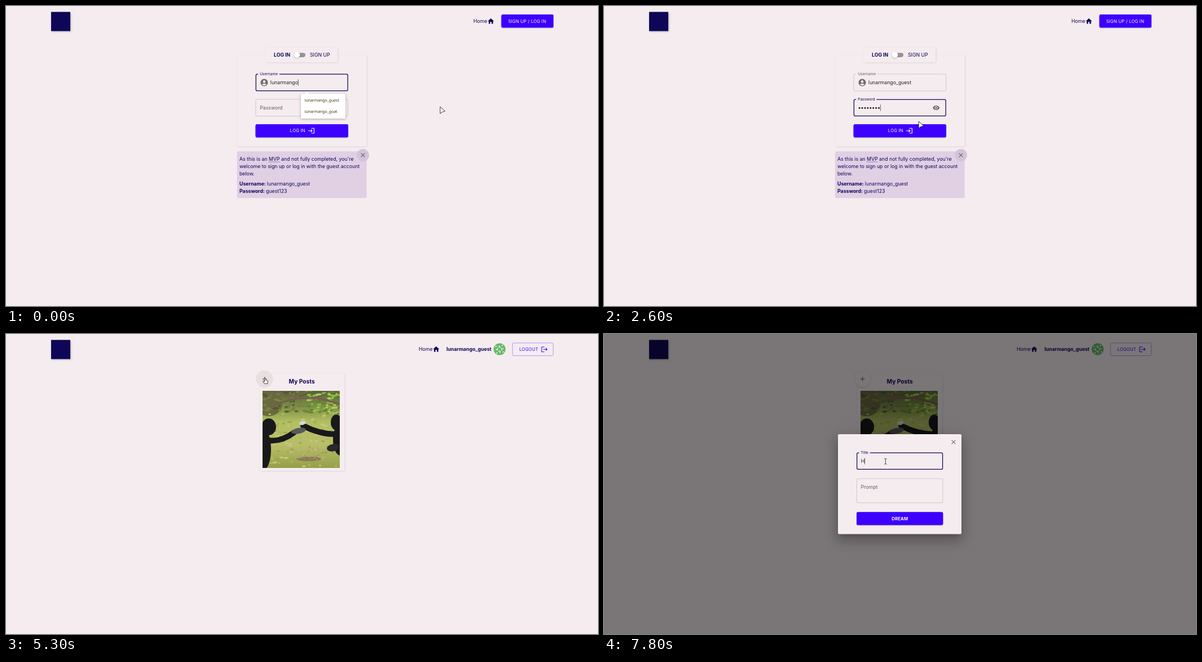
Recreate the animation shown at these times as an HTML page with a canvas. Size 1050 by 533 pixels, loop 8000 ms.

```html
<!DOCTYPE html>
<html lang="en">
<head>
<meta charset="utf-8">
<title>Log in and create</title>
<style>
  html, body { margin: 0; width: 100%; height: 100%; overflow: hidden; background: #f5ecef; }
  canvas { display: block; width: 1050px; height: 533px; }
</style>
</head>
<body>
<canvas id="stage" width="1050" height="533"></canvas>
<script>
const ctx = document.getElementById('stage').getContext('2d');
const LOOP = 8000, W = 1050, H = 533;
const PAGE = '#f5ecef', NAVY = '#0e0757', BLUE = '#3d00ff', GREY = 'rgba(0,0,0,.6)', INK = 'rgba(0,0,0,.87)';
const USER = 'lunarmango_guest', OTHER = 'lunarmango_goat', SECRET = 'guest123';
const BODY = 8.75, SMALL = 6.56, BUTTON = 7.66;
const ICONS = {
  account: 'M12 2C6.48 2 2 6.48 2 12s4.48 10 10 10 10-4.48 10-10S17.52 2 12 2zm0 4c1.93 0 3.5 1.57 3.5 3.5S13.93 13 12 13s-3.5-1.57-3.5-3.5S10.07 6 12 6zm0 14c-2.03 0-4.43-.82-6.14-2.88C7.55 15.8 9.68 15 12 15s4.45.8 6.14 2.12C16.43 19.18 14.03 20 12 20z',
  eye: 'M12 4.5C7 4.5 2.73 7.61 1 12c1.73 4.39 6 7.5 11 7.5s9.27-3.11 11-7.5c-1.73-4.39-6-7.5-11-7.5zM12 17c-2.76 0-5-2.24-5-5s2.24-5 5-5 5 2.24 5 5-2.24 5-5 5zm0-8c-1.66 0-3 1.34-3 3s1.34 3 3 3 3-1.34 3-3-1.34-3-3-3z',
  home: 'M10 20v-6h4v6h5v-8h3L12 3 2 12h3v8z',
  login: 'M11 7 9.6 8.4l2.6 2.6H2v2h10.2l-2.6 2.6L11 17l5-5-5-5zm9 12h-8v2h8c1.1 0 2-.9 2-2V5c0-1.1-.9-2-2-2h-8v2h8v14z',
  logout: 'm17 7-1.41 1.41L18.17 11H8v2h10.17l-2.58 2.58L17 17l5-5zM4 5h8V3H4c-1.1 0-2 .9-2 2v14c0 1.1.9 2 2 2h8v-2H4V5z',
  close: 'M19 6.41 17.59 5 12 10.59 6.41 5 5 6.41 10.59 12 5 17.59 6.41 19 12 13.41 17.59 19 19 17.59 13.41 12z',
  add: 'M19 13h-6v6h-2v-6H5v-2h6V5h2v6h6v2z'
};
const CURSORS = {
  arrow: new Path2D('M.2 .3V12.2L3.4 9.6 8.5 8Z'),
  hand: new Path2D('M-1 .8Q0-.4 1 .8V4.2L4.6 5Q5.4 5.3 5.2 6.5L4.4 10.8H-.8L-3.4 7.2Q-3.6 6-2.2 6.2L-1 7.2Z'),
  beam: new Path2D('M-2-5Q0-5 0-4Q0-5 2-5M0-4V4M-2 5Q0 5 0 4Q0 5 2 5')
};

// Last entry whose start time has passed.
const step = (t, list) => list.filter(e => e[0] <= t).pop();
const between = (t, a, b) => t >= a && t < b;

function text(s, x, y, { size = BODY, weight = 400, color = NAVY, align = 'left', space = 0, family = 'Inter' } = {}) {
  ctx.font = `${weight} ${size}px ${family}, sans-serif`;
  ctx.letterSpacing = space + 'px';
  ctx.textAlign = align;
  ctx.fillStyle = color;
  ctx.fillText(s, x, y);
  const w = ctx.measureText(s).width;
  ctx.letterSpacing = '0px';
  return w;
}

function box(x, y, w, h, r, fill) {
  ctx.beginPath();
  ctx.roundRect(x, y, w, h, r);
  if (fill) { ctx.fillStyle = fill; ctx.fill(); }
}

function blob(x, y, rx, ry, fill, turn = 0) {
  ctx.beginPath();
  ctx.ellipse(x, y, rx, ry, turn, 0, 7);
  ctx.fillStyle = fill;
  ctx.fill();
}

const disc = (x, y, r, fill) => blob(x, y, r, r, fill);

function shadow(alpha, blur, dy, draw, dx = 0) {
  ctx.save();
  ctx.shadowColor = `rgba(0,0,0,${alpha})`;
  ctx.shadowBlur = blur;
  ctx.shadowOffsetX = dx;
  ctx.shadowOffsetY = dy;
  draw();
  ctx.restore();
}

function icon(name, x, y, color, scale = .547) {
  ctx.save();
  ctx.translate(x, y);
  ctx.scale(scale, scale);
  ctx.translate(-12, -12);
  ctx.fillStyle = color;
  ctx.fill(new Path2D(ICONS[name]));
  ctx.restore();
}

function line(points, width, color) {
  ctx.beginPath();
  points.forEach(([x, y]) => ctx.lineTo(x, y));
  ctx.lineWidth = width;
  ctx.strokeStyle = color;
  ctx.stroke();
}

const caret = (x, y) => line([[x, y - 5.6], [x, y + 5.6]], .7, '#222');
const card = (x, y, w, h) => shadow(.11, 3, .8, () => box(x, y, w, h, 2.2, PAGE), .8);

function button(x, y, w, h, fill = BLUE, raised = false) {
  const paint = () => box(x, y, w, h, 2.2, fill);
  shadow(raised ? .3 : .2, raised ? 4 : 1.2, raised ? 2 : 1, paint);
  shadow(.13, raised ? 5.5 : 2.7, .6, paint);
}

// Outlined input whose label moves from inside (lift 0) to the border (lift 1).
function field(x, y, w, h, label, { lift = 1, focus = false, hover = false, labelColor } = {}) {
  const thick = focus ? 1.25 : .6;
  box(x + thick / 2, y + thick / 2, w - thick, h - thick, 2.2);
  ctx.lineWidth = thick;
  ctx.strokeStyle = focus ? NAVY : hover ? INK : 'rgba(0,0,0,.27)';
  ctx.stroke();
  ctx.font = `400 ${SMALL}px Inter, sans-serif`;
  if (lift > .4) {
    ctx.fillStyle = PAGE;
    ctx.fillRect(x + 4.4, y - 1, ctx.measureText(label).width + 6, 3);
  }
  text(label, x + 7.5, y + 18.3 - 16.1 * lift, {
    size: BODY + (SMALL - BODY) * lift,
    color: labelColor || (focus ? NAVY : GREY)
  });
}

function header(loggedIn) {
  shadow(.3, 3, 1, () => { ctx.fillStyle = NAVY; ctx.fillRect(80, 10.5, 34, 34); }, 1);
  const x = loggedIn ? 732 : 829;
  text('Home', x, 30.2);
  icon('home', x + 31, 27, NAVY);
  if (!loggedIn) {
    button(878.7, 15.3, 92.3, 23);
    text('SIGN UP / LOG IN', 890.7, 29.8, { size: BUTTON, color: '#fff', space: .22 });
    return;
  }
  text(USER, 861, 30.2, { weight: 700, align: 'right' });
  avatar(875.5, 27);
  box(898.4, 15.9, 72.2, 22.6, 2.2);
  ctx.lineWidth = .7;
  ctx.strokeStyle = 'rgba(61,0,255,.5)';
  ctx.stroke();
  text('LOGOUT', 910.5, 30, { size: BUTTON, color: BLUE, space: .22 });
  icon('logout', 955, 27.3, BLUE);
}

function avatar(x, y) {
  disc(x, y, 10.6, '#63b866');
  ctx.save();
  ctx.translate(x, y);
  ctx.fillStyle = '#edf3e8';
  for (let i = 0; i < 4; i++) {
    ctx.rotate(Math.PI / 2);
    ctx.fillRect(-1.5, -7, 1.6, 4);
    ctx.fillRect(-1.5, -4.2, 4, 1.4);
    ctx.fillRect(4, -8, 1.6, 3);
  }
  ctx.restore();
}

function infoBox() {
  box(409.7, 258.3, 230, 83, 2.6, '#e1cfe4');
  disc(633, 265, 11, '#d4c4d9');
  icon('close', 633, 265, '#655d69');
  const lead = text('As this is an ', 414, 274.7);
  const w = text('MVP', 414 + lead, 274.7);
  text(" and not fully completed, you're", 414 + lead + w, 274.7);
  ctx.setLineDash([.8, .8]);
  line([[414 + lead, 277], [414 + lead + w, 277]], .7, NAVY);
  ctx.setLineDash([]);
  text('welcome to sign up or log in with the guest account', 414, 287.8);
  text('below.', 414, 300.9);
  [['Username: ', USER, 318.5], ['Password: ', SECRET, 331.6]].forEach(([name, value, y]) => {
    const n = text(name, 414, y, { weight: 700 });
    text(value, 414 + n, y);
  });
}

function suggestions(t) {
  const names = t < 600 ? [USER, OTHER] : [USER];
  const h = 4.4 + names.length * 19.9;
  shadow(.3, 4, 1, () => box(523, 155.8, 79, h, 2, '#fff'));
  ctx.beginPath();
  ctx.moveTo(530, 156);
  ctx.lineTo(534, 152);
  ctx.lineTo(538, 156);
  ctx.fillStyle = '#fff';
  ctx.fill();
  names.forEach((s, i) => text(s, 529.7, 170.2 + i * 19.9,
    { size: 6.9, weight: 500, color: '#463819', family: '"Noto Sans"' }));
}

function loginPage(t) {
  header(false);
  card(409.7, 87, 230, 162.5);
  card(461, 74, 127.3, 26);
  text('LOG IN', 475, 90.2, { weight: 700 });
  text('SIGN UP', 539, 90.2);
  box(512.4, 83.2, 18.6, 7.7, 3.8, '#979193');
  shadow(.3, 2, .8, () => disc(516, 87, 5.4, '#fff'));

  const userFocus = t < 900, passFocus = between(t, 900, 3000);
  field(442.7, 120.6, 164.1, 30.6, 'Username', { focus: userFocus });
  icon('account', 458, 136, 'rgba(0,0,0,.54)', .65);
  const typed = step(t, [[0, 10], [300, 11], [500, 12], [600, 13], [700, 14], [800, 16]])[1];
  const w = text(USER.slice(0, typed), 468.8, 139, { color: '#242123' });
  if (userFocus) caret(469.2 + w, 135.9);

  field(442.7, 165.4, 164.1, 30.6, 'Password', {
    lift: step(t, [[0, 0], [900, .3], [1000, .8], [1100, 1]])[1],
    focus: passFocus,
    hover: between(t, 3000, 3900),
    labelColor: between(t, 3000, 3200) ? NAVY : undefined
  });
  const dots = step(t, [[0, 0], [1200, 1], [1300, 2], [1400, 3], [1500, 4], [1600, 5], [1900, 7], [2000, 8]])[1];
  const shown = between(t, 3200, 3700);
  if (shown) text(SECRET, 450.5, 184, { color: '#242123' });
  else for (let i = 0; i < dots; i++) disc(453.1 + i * 4.92, 181.2, 1.45, '#1d1a1c');
  if (passFocus) caret(450.7 + dots * 4.92 + .3, 180.8);
  if (between(t, 3000, 3900)) disc(589.2, 181, 10.9, `rgba(0,0,0,${between(t, 3200, 3400) ? .12 : .05})`);
  icon('eye', 589.2, 180.8, 'rgba(0,0,0,.58)');
  if (shown) {
    line([[584.8, 175.2], [595, 185.6]], 1.1, PAGE);
    line([[584, 176], [594.2, 186.4]], 1.1, '#666163');
  }

  const pressed = t >= 4100;
  button(442.7, 210.2, 164.1, 23, pressed ? '#2b00b3' : t >= 3900 ? '#3200cf' : BLUE, pressed);
  if (pressed) disc(580.3, 221.8, 9.6, 'rgba(255,255,255,.1)');
  text('LOG IN', 503.8, 224.4, { size: BUTTON, color: '#fff', space: .22 });
  icon('login', 541.5, 221.7, '#fff');
  infoBox();
  if (t < 800) suggestions(t);
}

function limb([[x, y], [cx, cy], [ex, ey]], width, color) {
  ctx.beginPath();
  ctx.moveTo(x, y);
  ctx.quadraticCurveTo(cx, cy, ex, ey);
  ctx.lineWidth = width;
  ctx.strokeStyle = color;
  ctx.stroke();
}

// Soft scatter of small strokes inside a rectangle, the same on every call.
function scatter(count, x, y, w, h, colors, size) {
  const spread = (i, k) => Math.abs(Math.sin(i * k) * 9973) % 1;
  for (let i = 1; i <= count; i++)
    blob(x + w * spread(i, 12.9), y + h * spread(i, 78.2), size * (.6 + spread(i, 3.7)), size * .6, colors[i % colors.length]);
}

function photo() {
  const fur = '#19191b', bark = '#75614d';
  ctx.save();
  ctx.beginPath();
  ctx.rect(455, 101, 137, 137);
  ctx.clip();
  const g = ctx.createLinearGradient(0, 101, 0, 238);
  [[0, '#546435'], [.22, '#7f9445'], [.4, '#b3be62'], [.7, '#b9bd69'], [1, '#93a048']]
    .forEach(([p, c]) => g.addColorStop(p, c));
  ctx.fillStyle = g;
  ctx.fillRect(455, 101, 137, 137);
  blob(466, 124, 24, 22, '#69683f');
  scatter(60, 455, 101, 80, 38, ['#4e5a30', '#7b7a4c', '#72873f'], 3);
  scatter(70, 535, 101, 57, 42, ['#8fb743', '#b0cc5c', '#64803a'], 3);
  scatter(110, 455, 142, 137, 96, ['#c8ca7b', '#98a64c', '#aeb95a'], 2.6);
  blob(537, 222, 22, 4, '#8a7a50');
  scatter(45, 507, 202, 58, 22, ['#c68ba4', '#d3a4b5', '#a8a968'], 1.1);
  ctx.lineCap = 'round';
  limb([[480, 101], [503, 118], [530, 104]], 4, bark);
  limb([[472, 130], [525, 99], [592, 125]], 4, bark);
  limb([[545, 113], [562, 111], [575, 101]], 2.5, bark);
  blob(457, 205, 13, 36, fur);
  blob(466, 165, 13, 15, fur);
  limb([[466, 189], [488, 192], [511, 175]], 10, fur);
  blob(593, 188, 13, 28, fur);
  blob(586, 157, 10, 14, fur);
  limb([[588, 178], [558, 179], [527, 163]], 10, fur);
  blob(580, 202, 11, 6.5, '#28272a', -.2);
  blob(519, 172, 13, 5, '#58595b', -.2);
  blob(526, 158, 6, 3.5, '#d5d7d3', -.25);
  ctx.restore();
}

function postsPage(t) {
  header(true);
  card(450, 70, 150, 173);
  const hover = between(t, 5000, 5500), ripple = between(t, 5500, 5800);
  if (hover) disc(458.5, 80, 15.2, t < 5300 ? '#ece2e5' : '#e8dfe1');
  else shadow(.17, 3, .6, () => disc(458.5, 80, 14.2, PAGE));
  if (ripple) disc(458.5, 80, 11, 'rgba(0,0,0,.13)');
  icon('add', 458.5, 80, '#615c5f');
  text('My Posts', 524.6, 88, { size: 10.24, weight: 700, align: 'center' });
  photo();
}

function dialog(t) {
  const fade = t < 5800 ? .95 : 1;
  ctx.fillStyle = `rgba(0,0,0,${.5 * fade})`;
  ctx.fillRect(0, 0, W, H);
  ctx.save();
  ctx.globalAlpha = fade;
  // Shadows are cast by off-stage boxes so the sheet itself stays translucent.
  [[.14, 21, 13, 1.6], [.12, 25, 5, 4.4], [.2, 8, 6, -3.8]].forEach(([alpha, blur, dy, grow]) =>
    shadow(alpha, blur, dy, () => box(415 - 3000 - grow, 178 - grow, 219 + 2 * grow, 177.5 + 2 * grow, 2.2, '#000'), 3000));
  box(415, 178, 219, 177.5, 2.2, PAGE);
  icon('close', 620, 192, '#6b666a');

  const clicked = t >= 6100, settling = between(t, 6100, 6400);
  field(448, 210.5, 153.2, 30.6, 'Title', { lift: !clicked ? 0 : settling ? .6 : 1, focus: clicked });
  field(448, 256.7, 153.2, 43.4, 'Prompt', { lift: !clicked ? 1 : settling ? .4 : 0, focus: !clicked });
  if (!clicked) {
    const hint = { color: 'rgba(0,0,0,.38)' };
    text('A rainbow colored dragon curled', 455.7, 275.2, hint);
    text('up on a bed of clouds.', 455.7, 288.2, hint);
    caret(456.2, 272);
  } else {
    const w = t >= 7800 ? text('H', 455.7, 229, { color: '#242123' }) : 0;
    if (!between(t, 6900, 7300)) caret(456 + w, 226);
  }
  button(448, 316.4, 153.2, 22.8);
  text('DREAM', 524.8, 330.7, { size: BUTTON, weight: 700, color: '#fff', align: 'center', space: .22 });
  ctx.restore();
}

function pointer(t) {
  const [, x, y, kind] = step(t, [
    [0, 769.8, 179, 'arrow'], [2200, 802, 168, 'arrow'], [2300, 842, 155.5, 'arrow'],
    [2400, 776, 165, 'arrow'], [2500, 650, 188, 'arrow'], [2600, 558, 205, 'arrow'],
    [3000, 589, 184.5, 'hand'], [3700, 589, 186.5, 'hand'], [3900, 578.5, 222.2, 'hand'],
    [4800, 535, 165, 'arrow'], [5000, 459.3, 77.5, 'hand'], [5500, 468, 88, 'arrow'],
    [5800, 527, 226.3, 'beam'], [7800, 499.3, 226.3, 'beam']
  ]);
  ctx.save();
  ctx.translate(x, y);
  ctx.lineJoin = ctx.lineCap = 'round';
  if (kind === 'beam') {
    ctx.lineWidth = 2;
    ctx.strokeStyle = '#fff';
    ctx.stroke(CURSORS.beam);
  } else {
    ctx.fillStyle = '#fff';
    ctx.fill(CURSORS[kind]);
  }
  ctx.lineWidth = .9;
  ctx.strokeStyle = '#222';
  ctx.stroke(CURSORS[kind]);
  ctx.restore();
}

const start = performance.now();
function frame(now) {
  const t = Math.max(0, now - start) % LOOP;
  ctx.fillStyle = PAGE;
  ctx.fillRect(0, 0, W, H);
  if (t < 4500) loginPage(t);
  else postsPage(t);
  if (t >= 5500) dialog(t);
  pointer(t);
  requestAnimationFrame(frame);
}
frame(start);
</script>
</body>
</html>
```
